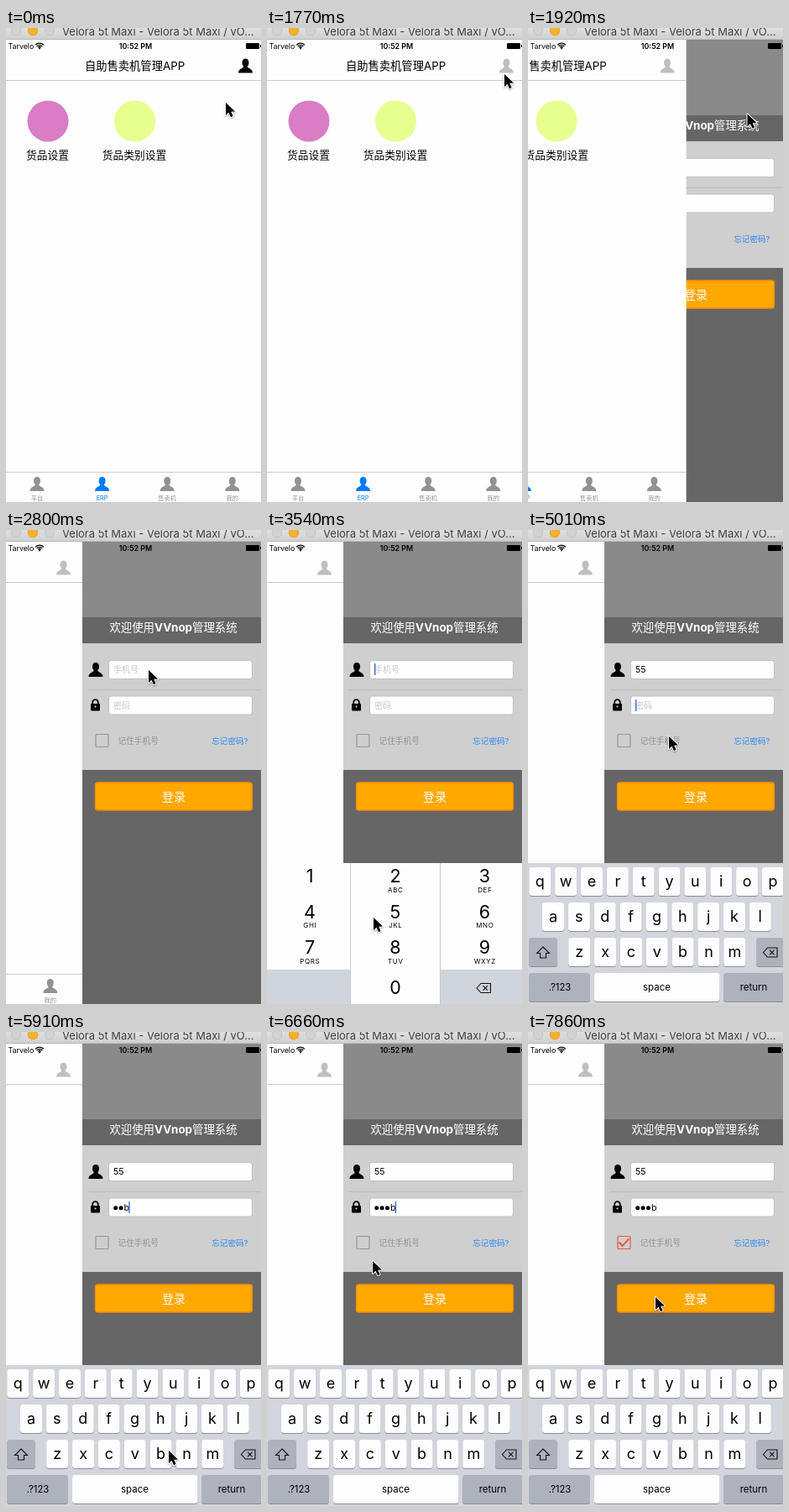
Animation, 304 px wide and 565 px high, one loop 8 s. Source, as an HTML page with a canvas:

```html
<!DOCTYPE html>
<html lang="zh-CN">
<head>
<meta charset="utf-8">
<title>登录演示</title>
<style>
html, body { margin: 0; width: 100%; height: 100%; overflow: hidden; background: #fff; }
canvas { display: block; width: 304px; height: 565px; }
</style>
</head>
<body>
<canvas id="stage"></canvas>
<script>
const W = 304, H = 565, LOOP = 8000;
const canvas = document.getElementById('stage');
const ratio = window.devicePixelRatio || 1;
canvas.width = W * ratio;
canvas.height = H * ratio;
const c = canvas.getContext('2d');
c.scale(ratio, ratio);

const FONT = 'Inter, "Noto Sans CJK SC", "Noto Sans CJK", sans-serif';
const BLUE = '#007aff', GRAY = '#929292', SLIDE = 217, KEYTOP = 397;

// Pointer stops: step, x, y
const PATH = [
  [0, 262, 89], [2, 215, 165], [4, 142, 270], [6, 190, 215], [8, 250, 120],
  [10, 279, 62], [11, 284, 50], [12, 283, 55], [14, 240, 150], [16, 181, 241],
  [17, 180, 235], [18, 174, 190], [19, 170, 167], [22, 170, 167], [23, 145, 360],
  [24, 127, 462], [25, 146, 458], [29, 148, 457], [30, 150, 400], [31, 160, 280],
  [32, 165, 207], [33, 165, 207], [34, 168, 246], [35, 176, 345], [37, 194, 499],
  [41, 194, 499], [43, 154, 370], [44, 139, 313], [45, 126, 273], [46, 123, 257],
  [47, 122, 251], [49, 122, 251], [50, 126, 262], [52, 150, 309], [53, 152, 316]
];
const BLINK = [1, .5, 0, 0, .7, 1, 1, .6, .15];

function stepAt(t) {
  return t < 5005 ? Math.floor(t / 147.2) : 34 + Math.floor((t - 5005) / 150);
}

function pointer(k) {
  const i = PATH.findIndex(p => p[0] >= k);
  if (i < 0) return PATH[PATH.length - 1].slice(1);
  if (i === 0) return PATH[0].slice(1);
  const a = PATH[i - 1], b = PATH[i], f = (k - a[0]) / (b[0] - a[0]);
  return [a[1] + (b[1] - a[1]) * f, a[2] + (b[2] - a[2]) * f];
}

function rect(x, y, w, h, color) {
  c.fillStyle = color;
  c.fillRect(x, y, w, h);
}

function disc(x, y, r, color) {
  c.fillStyle = color;
  c.beginPath();
  c.arc(x, y, r, 0, 7);
  c.fill();
}

function box(x, y, w, h, r, fill, stroke, lw = 1) {
  c.beginPath();
  c.roundRect(x, y, w, h, r);
  if (fill) { c.fillStyle = fill; c.fill(); }
  if (stroke) { c.strokeStyle = stroke; c.lineWidth = lw; c.stroke(); }
}

function line(points, color, lw, close) {
  c.beginPath();
  points.forEach(([x, y]) => c.lineTo(x, y));
  if (close) c.closePath();
  c.strokeStyle = color;
  c.lineWidth = lw;
  c.stroke();
}

// y is the visual middle of the glyphs
function text(s, x, y, size, color = '#000', align = 'center', weight = 400) {
  c.font = `${weight} ${size}px ${FONT}`;
  c.textAlign = align;
  c.fillStyle = color;
  c.fillText(s, x, y + size * .37);
}

function person(x, y, color) {
  c.save();
  c.translate(x, y);
  c.fillStyle = color;
  c.beginPath();
  c.ellipse(0, -3.6, 4, 5, 0, 0, 7);
  c.fill();
  c.beginPath();
  c.moveTo(-2.2, 0);
  c.lineTo(2.2, 0);
  c.bezierCurveTo(2, 4, 8.5, 2.5, 8.5, 8.4);
  c.lineTo(-8.5, 8.4);
  c.bezierCurveTo(-8.5, 2.5, -2, 4, -2.2, 0);
  c.fill();
  c.restore();
}

function lock(x, y) {
  box(x - 5.5, y - 1.5, 11, 8.5, 1, '#000');
  c.strokeStyle = '#000';
  c.lineWidth = 1.8;
  c.beginPath();
  c.moveTo(x - 3.3, y - 1);
  c.lineTo(x - 3.3, y - 3);
  c.arc(x, y - 3, 3.3, Math.PI, 0);
  c.lineTo(x + 3.3, y - 1);
  c.stroke();
  disc(x, y + 2, 1.1, '#cfcfcf');
}

function eraser(x, y) {
  line([[x - 8.5, y], [x - 3.5, y - 5.5], [x + 8, y - 5.5], [x + 8, y + 5.5], [x - 3.5, y + 5.5]], '#111', 1.1, true);
  line([[x - 1, y - 2.8], [x + 4.6, y + 2.8]], '#111', 1.1);
  line([[x - 1, y + 2.8], [x + 4.6, y - 2.8]], '#111', 1.1);
}

function windowBar() {
  const g = c.createLinearGradient(0, 0, 0, 14);
  g.addColorStop(0, '#dfdfdf');
  g.addColorStop(1, '#cfcfcf');
  rect(0, 0, W, 14, g);
  rect(0, 13, W, 1, '#b9b9b9');
  [12, 32, 52].forEach((x, i) => {
    disc(x, 3, 6.2, i === 1 ? '#e09e1f' : '#bdbdbd');
    disc(x, 3, 5.6, i === 1 ? '#f5b02c' : '#d2d2d2');
  });
  text('Velora 5t Maxi - Velora 5t Maxi / vO...', 67, 4, 13, '#3f3f3f', 'left');
}

function statusBar() {
  text('Tarvelo', 2.5, 21.5, 8.8, '#000', 'left');
  c.strokeStyle = '#000';
  c.lineWidth = 1.3;
  [2.6, 4.7, 6.8].forEach(r => {
    c.beginPath();
    c.arc(40, 25, r, -Math.PI * .75, -Math.PI * .25);
    c.stroke();
  });
  disc(40, 24.3, 1.1, '#000');
  text('10:52 PM', 154.5, 21.5, 8.9, '#000', 'center', 600);
  box(286, 18, 16, 7, 1.2, '#000');
  rect(303, 20, 1, 3, '#000');
}

function mainPage(shift, pressed) {
  c.save();
  c.translate(-shift, 0);
  rect(0, 14, 308, 551, '#fefefe');
  rect(0, 62, 308, 1, '#c9c9c9');
  text('自助售卖机管理APP', 153.5, 45, 13.3);
  person(285.5, 45, pressed ? '#bfbfbf' : '#000');
  disc(50, 111, 24.5, '#d87dc6');
  disc(153.5, 111, 24.5, '#e7ff8f');
  text('货品设置', 49.5, 151, 12.75);
  text('货品类别设置', 153, 151, 12.75);
  rect(0, 529, 308, 1, '#cecece');
  ['平台', 'ERP', '售卖机', '我的'].forEach((s, i) => {
    const x = 37 + i * 77.6, color = i === 1 ? BLUE : GRAY;
    person(x, 543.5, color);
    text(s, x, 560.5, 7.3, color);
  });
  c.restore();
}

function heading() {
  const parts = [['欢迎使用', 400], ['VVnop', 700], ['管理系统', 400]];
  const width = ([s, w]) => {
    c.font = `${w} 13.4px ${FONT}`;
    return c.measureText(s).width;
  };
  let x = 199.5 - parts.reduce((sum, p) => sum + width(p), 0) / 2;
  for (const p of parts) {
    text(p[0], x, 116, 13.4, '#fff', 'left', p[1]);
    x += width(p);
  }
}

function caret(x, y, alpha) {
  c.globalAlpha = alpha;
  rect(x, y, 1.4, 14, '#4268d8');
  c.globalAlpha = 1;
}

function drawer(k) {
  rect(0, 14, W, 90, '#8a8a8a');
  rect(0, 104, W, 461, '#666');
  rect(0, 135, W, 151, '#cfcfcf');
  heading();
  rect(98, 190, 206, 1, '#bcbcbc');
  box(122.5, 155.5, 171, 22, 3, '#fefefe', '#c0c0c0');
  box(122.5, 198, 171, 22, 3, '#fefefe', '#c0c0c0');
  person(107, 166.5, '#000');
  lock(106.5, 208.5);

  const digits = k < 25 ? 0 : k < 27 ? 1 : 2;
  if (digits) text('5'.repeat(digits), 128, 166.5, 10.6, '#000', 'left');
  else text('手机号', 128, 166, 10, '#c7c7cc', 'left');
  const typed = Math.max(0, Math.min(4, k - 37));
  if (typed) {
    for (let i = 0; i < typed - 1; i++) disc(130.7 + i * 6.4, 209.7, 2.5, '#000');
    text('b', 127.7 + (typed - 1) * 6.4, 209, 10.6, '#000', 'left');
  } else text('密码', 128, 209, 10, '#c7c7cc', 'left');

  if (k >= 22 && k < 33) {
    caret(128 + digits * 6.7, 159, k >= 25 && k < 29 ? 1 : BLINK[(k - 18) % 9]);
  } else if (k >= 33) {
    const a = k < 38 ? BLINK[(k - 28) % 9] : k < 45 ? 1 : k === 53 ? .15 : BLINK[(k - 45) % 9];
    caret(typed ? 133.5 + (typed - 1) * 6.4 : 128, 202, a);
  }

  const on = k >= 49;
  box(107, 243.5, 15, 15, 1, null, on ? '#ee5443' : '#969696', 1.2);
  if (on) line([[108.5, 250.5], [112.5, 255], [120.5, 246.5]], '#ee5443', 2);
  text('记住手机号', 133.5, 251, 9.7, '#909090', 'left');
  text('忘记密码?', 288.5, 251, 9.6, '#2b87f5', 'right');
  box(106.5, 301, 187, 33, 3, '#ffa800', '#ff8a00', 1.3);
  text('登录', 200, 317.5, 14, '#fff');
}

function numpad(k) {
  const cols = [51, 153, 259.5];
  const subs = ['', 'ABC', 'DEF', 'GHI', 'JKL', 'MNO', 'PQRS', 'TUV', 'WXYZ'];
  rect(0, KEYTOP, W, 168, '#fdfdfd');
  rect(0, 524, 99, 41, '#d0d4db');
  rect(207, 524, 97, 41, '#d0d4db');
  if (k === 25 || k === 27) rect(100, 440, 106, 42, '#d0d4db');
  rect(99, KEYTOP, 1, 168, '#c8cace');
  rect(206, KEYTOP, 1, 168, '#c8cace');
  subs.forEach((s, i) => {
    const x = cols[i % 3], y = 412.5 + Math.floor(i / 3) * 42.4;
    text(String(i + 1), x, y, 21.5);
    c.letterSpacing = '0.6px';
    text(s, x + .3, y + 16.5, 8);
    c.letterSpacing = '0px';
  });
  text('0', 153, 545, 21.5);
  eraser(258.5, 546);
}

function key(x, y, w, dark) {
  box(x, y + 1, w, 34, 3.5, '#8b8e94');
  box(x, y, w, 34, 3.5, dark ? '#adb2bc' : '#fdfdfd');
}

function letters() {
  rect(0, KEYTOP, W, 168, '#d2d5dc');
  [['qwertyuiop', 14.3, 402], ['asdfghjkl', 30, 444], ['zxcvbnm', 61.2, 486]].forEach(([row, x0, y]) => {
    [...row].forEach((ch, i) => {
      const x = x0 + i * 30.85;
      key(x - 13, y, 26, false);
      text(ch, x, y + 16.3, 18);
    });
  });
  key(1, 486, 34, true);
  key(272, 486, 34, true);
  line([[18, 497], [25.5, 504.5], [21.5, 504.5], [21.5, 510], [14.5, 510], [14.5, 504.5], [10.5, 504.5]], '#111', 1.1, true);
  eraser(289, 503.5);
  key(1, 528, 73, true);
  key(79, 528, 149.5, false);
  key(233, 528, 73, true);
  text('.?123', 38, 545, 11.3);
  text('space', 153.5, 544.5, 11.5);
  text('return', 269, 545, 11.5);
}

function arrow(x, y) {
  c.save();
  c.translate(x, y);
  c.beginPath();
  [[0, 0], [0, 15], [3.5, 11.8], [6, 17.2], [8.6, 16], [6.2, 10.8], [11, 10.6]].forEach(p => c.lineTo(...p));
  c.closePath();
  c.lineJoin = 'round';
  c.shadowColor = 'rgba(0,0,0,.35)';
  c.shadowBlur = 2 * ratio;
  c.shadowOffsetY = ratio;
  c.strokeStyle = '#fff';
  c.lineWidth = 2;
  c.stroke();
  c.shadowColor = 'transparent';
  c.fillStyle = '#000';
  c.fill();
  c.restore();
}

function draw(t) {
  const k = stepAt(t);
  const open = k < 13 ? 0 : k === 13 ? .55 : 1;
  const rise = k < 23 ? 0 : k === 23 ? .75 : 1;
  c.clearRect(0, 0, W, H);
  if (open) drawer(k);
  mainPage(SLIDE * open, k >= 12);
  if (rise) {
    c.save();
    c.translate(0, 168 * (1 - rise));
    k < 33 ? numpad(k) : letters();
    c.restore();
  }
  statusBar();
  windowBar();
  arrow(...pointer(k));
}

const start = performance.now();
function tick() {
  draw((performance.now() - start) % LOOP);
  requestAnimationFrame(tick);
}
tick();
</script>
</body>
</html>
```
